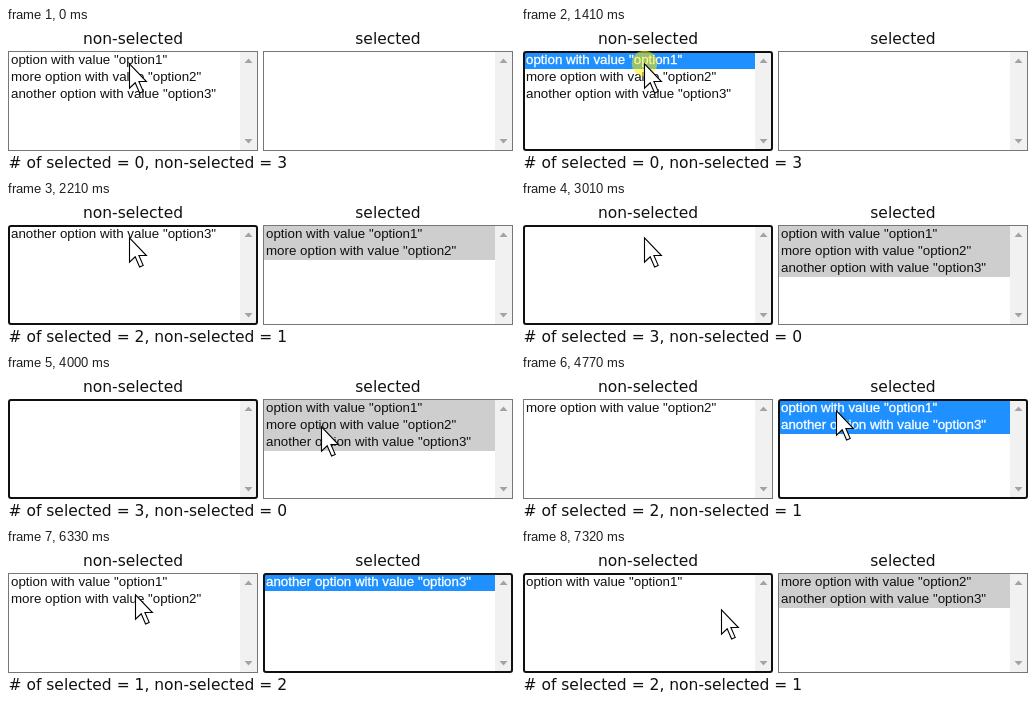
Animation, 509 px wide and 146 px high, one loop 7.65 s. Source, as an HTML page:

```html
<!DOCTYPE html>
<html lang="en">
<head>
<meta charset="utf-8">
<title>Dual list box</title>
<style>
  html, body { margin: 0; width: 100%; height: 100%; overflow: hidden; background: #fff; }
  svg { display: block; width: 100%; height: 100%; }
  .label { font: 15.5px "DejaVu Sans", sans-serif; fill: #111; }
  .option { font: 13.333px "Liberation Sans", Arial, sans-serif; fill: #101010; }
  .option.lit { fill: #fff; stroke: #fff; stroke-width: .3px; }
  .frame { fill: none; stroke: #767676; }
  .frame.focus { stroke: #101010; stroke-width: 2px; }
</style>
</head>
<body>
<svg viewBox="0 0 509 146" xmlns="http://www.w3.org/2000/svg">
  <text class="label" x="127" y="16" text-anchor="middle">non-selected</text>
  <text class="label" x="382" y="16" text-anchor="middle">selected</text>
  <g id="lists"></g>
  <text class="label" id="count" x="2.5" y="140"></text>
  <g id="pointer">
    <circle id="halo" cx="0.5" cy="0.5" r="12.7" fill="#ffee00" fill-opacity=".52"/>
    <path d="M.5 .8V25.2L6.2 19.8L10.6 30L14.2 28.4L9.9 18.5H17.4Z" fill="#fff" stroke="#000" stroke-width="1.1"/>
  </g>
</svg>
<script>
const LOOP = 7650;
const NAMES = { 1: 'option', 2: 'more option', 3: 'another option' };
const LEFT = 2, RIGHT = 257;

// at, left options, right options, focused list, pressed option
const STATES = [
  [0, '123', '', 0, ''],
  [1410, '123', '', LEFT, '1'],
  [1510, '23', '1', LEFT, ''],
  [2110, '23', '1', LEFT, '2'],
  [2210, '3', '12', LEFT, ''],
  [2910, '3', '12', LEFT, '3'],
  [3010, '', '123', LEFT, ''],
  [4330, '', '123', RIGHT, '2'],
  [4430, '2', '13', RIGHT, ''],
  [5110, '2', '13', RIGHT, '1'],
  [5330, '12', '3', RIGHT, ''],
  [6780, '1', '23', LEFT, '']
];

const smooth = p => p * p * (3 - 2 * p);
const settle = p => 1 - (1 - p) ** 3;

// first step, last step, number of steps, destination, downward bend, easing
const GLIDES = [
  [3240, 4000, 8, 315, 50, 9, smooth],
  [4550, 4990, 5, 315, 33, 0, settle],
  [5430, 6010, 6, 131, 29, 0, smooth],
  [6110, 6110, 1, 129, 30, 0, smooth],
  [6330, 6330, 1, 129, 44, 0, smooth],
  [7000, 7100, 2, 200, 58, 0, smooth],
  [7320, 7320, 1, 200, 59, 0, smooth]
];

const byId = id => document.getElementById(id);
const lists = byId('lists'), count = byId('count'), pointer = byId('pointer'), halo = byId('halo');

function pointerAt(time) {
  let x = 123, y = 35;
  for (const [start, end, steps, toX, toY, bend, ease] of GLIDES) {
    if (time < start) break;
    const pause = (end - start) / (steps - 1) || 1;
    const step = Math.min(steps, Math.floor((time - start + 1) / pause) + 1);
    const p = ease(step / steps);
    x += (toX - x) * p;
    y += (toY - y) * p + bend * Math.sin(Math.PI * p);
  }
  return [Math.round(x), Math.round(y)];
}

function listBox(x, options, focused, isLit) {
  const color = focused ? '#1e90ff' : '#cecece';
  const rows = [...options].map((id, i) => {
    const y = 24 + 17 * i, lit = isLit(id);
    const back = lit ? `<rect x="${x + 1}" y="${y}" width="231" height="17" fill="${color}"/>` : '';
    return `${back}<text class="option${lit && focused ? ' lit' : ''}" x="${x + 3}" y="${y + 12}">` +
      `${NAMES[id]} with value "option${id}"</text>`;
  }).join('');
  const inset = focused ? 1 : 0.5;
  return `${rows}
    <rect x="${x + 232}" y="24" width="17" height="98" fill="#f1f1f1"/>
    <path d="M${x + 236.5} 35h8l-4-4.5zM${x + 236.5} 111h8l-4 4.5z" fill="#a3a3a3"/>
    <rect class="frame${focused ? ' focus' : ''}" x="${x + inset}" y="${23 + inset}"
      width="${250 - 2 * inset}" height="${100 - 2 * inset}" rx="${focused ? 2 : 0}"/>`;
}

function showState([, left, right, focus, pressed]) {
  const pressedRight = focus === RIGHT && pressed;
  lists.innerHTML =
    listBox(LEFT, left, focus === LEFT, id => id === pressed) +
    listBox(RIGHT, right, focus === RIGHT, id => !pressedRight || id === pressed);
  count.textContent = `# of selected = ${right.length}, non-selected = ${left.length}`;
  halo.style.display = pressed ? '' : 'none';
}

let shown;
function draw(now) {
  const time = now % LOOP;
  const state = STATES.findLast(s => s[0] <= time);
  if (state !== shown) showState(shown = state);
  pointer.setAttribute('transform', `translate(${pointerAt(time)})`);
}

function tick() {
  draw(performance.now());
  requestAnimationFrame(tick);
}
tick();
</script>
</body>
</html>
```
